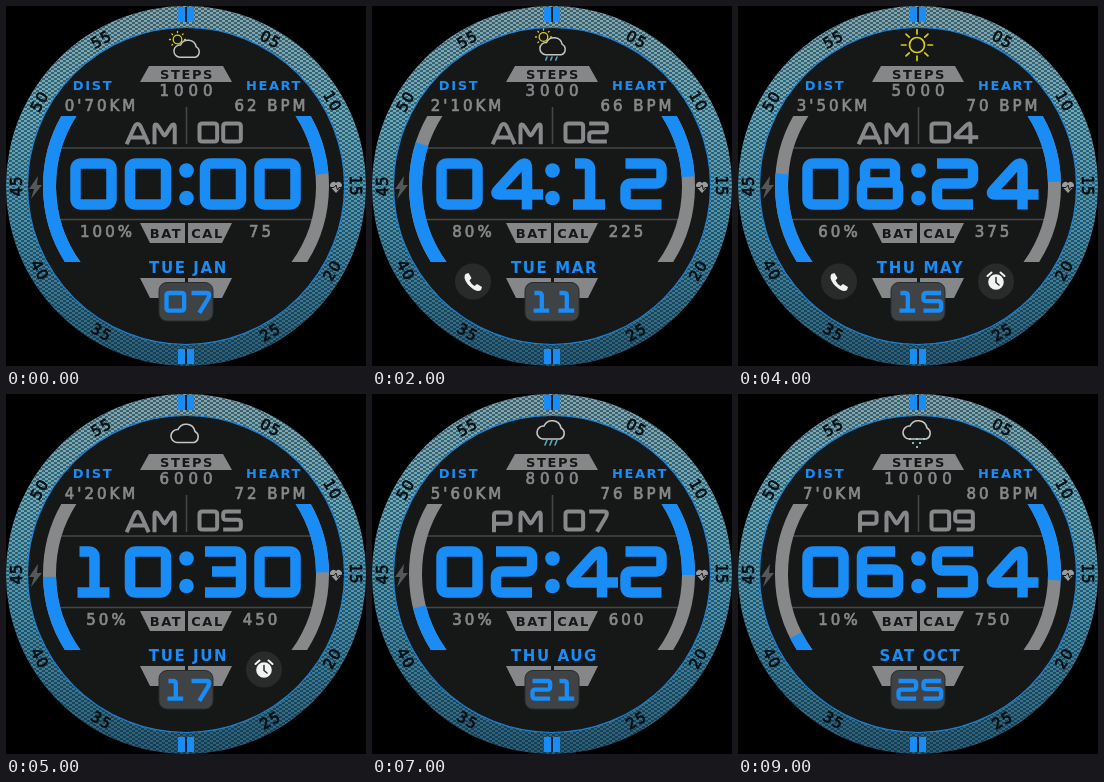
These frames come from a looping animation (360 px wide and 360 px high, 10000 ms). An HTML page:

```html
<!DOCTYPE html>
<html lang="en">
<head>
<meta charset="utf-8">
<title>Watch face</title>
<style>
  html, body { margin: 0; width: 100%; height: 100%; overflow: hidden; background: #000; }
  svg { display: block; width: 100vw; height: 100vh; }
  text { font-family: "DejaVu Sans", sans-serif; text-anchor: middle; }
  .label { font-weight: bold; font-size: 13px; letter-spacing: 1.6px; }
  .value { font-size: 15px; letter-spacing: 3px; fill: #868889; stroke: #868889; stroke-width: .7px; }
  .steps { letter-spacing: 5px; }
  .date { font-size: 15px; letter-spacing: 1.6px; }
  .blue { fill: #1a8cf5; }
  .dark { fill: #161818; }
  .minute { font-size: 15px; letter-spacing: 1px; fill: #081014; stroke: #081014; stroke-width: .7px; }
  .plate { fill: #858788; }
  .glyph { fill: none; stroke-linejoin: round; vector-effect: non-scaling-stroke; }
  .line { fill: none; stroke-linecap: round; stroke-linejoin: round; }
</style>
</head>
<body>
<svg viewBox="0 0 360 360">
  <defs>
    <linearGradient id="metal" x2="0" y2="1">
      <stop offset="0" stop-color="#7fa6b0"/>
      <stop offset=".3" stop-color="#67abc0"/>
      <stop offset=".6" stop-color="#4792b0"/>
      <stop offset="1" stop-color="#285d78"/>
    </linearGradient>
    <pattern id="weave" width="6" height="4" patternUnits="userSpaceOnUse">
      <path d="M0 0h3v2h-3zM3 2h3v2h-3z" fill="#071820" fill-opacity=".5"/>
    </pattern>
    <clipPath id="gaugeArea"><path d="M30 110H330V256H30z"/></clipPath>
  </defs>

  <circle cx="180" cy="180" r="180" fill="url(#metal)"/>
  <circle cx="180" cy="180" r="180" fill="url(#weave)"/>
  <circle cx="180" cy="180" r="158.5" fill="#161818" stroke="#1d7fd0" stroke-width="1.2"/>
  <g id="minutes"></g>
  <path d="M179 1h2v15h-2zM179 343h2v15h-2z" fill="#10222c"/>
  <path class="blue" d="M172 1h7v15h-7zM181 1h7v15h-7zM172 343h7v15h-7zM181 343h7v15h-7z"/>

  <path d="M54 142H306M54 213.5H306M180.5 101V138" stroke="#444747" stroke-width="1.6"/>
  <path class="plate" d="M143 60H217L226 76H134zM134 217H179V237H144zM182 217H226L216 237H182zM134 272H179V292H144zM182 272H226L216 292H182z"/>
  <rect x="153" y="276.5" width="54" height="38.5" rx="8" fill="#404345" stroke="#292c2d"/>

  <text class="label dark" x="181" y="73">STEPS</text>
  <text class="label dark" x="160" y="232">BAT</text>
  <text class="label dark" x="201.5" y="232">CAL</text>
  <text class="label blue" x="87" y="84">DIST</text>
  <text class="label blue" x="268" y="84">HEART</text>

  <path d="M32 170L23 183H28L25 193L36 179H31z" fill="#555858"/>
  <path d="M330 187L325 181.5A3.2 3.2 0 0 1 330 177A3.2 3.2 0 0 1 335 181.5z" fill="#9a9c9c"/>
  <path class="line" d="M324 181.5H328L330 179L331.5 184L333 181.5H336" stroke="#161818"/>
  <g id="live"></g>
</svg>

<script>
const BLUE = '#1a8cf5', GRAY = '#868889', YELLOW = '#d8cc18', CLOUD = '#c4c6c6', CYAN = '#54a9c4';
const live = document.getElementById('live');

// Centre lines of the square display face on a 36 x 41 grid; "z" closes a stroke.
const GLYPHS = {
  0: ['0,0 36,0 36,41 0,41 z'],
  1: ['4,0 19,0 19,41', '2,41 34,41'],
  2: ['0,0 36,0 36,20 0,20 0,41 36,41'],
  3: ['0,0 36,0 36,41 0,41', '7,20 36,20'],
  4: ['31,46 31,0 26,0 -2,31 47,31'],
  5: ['36,0 0,0 0,19 36,19 36,41 0,41'],
  6: ['33,0 0,0 0,41 36,41 36,18 0,18'],
  7: ['0,0 36,0 36,9 16,46'],
  8: ['3,0 33,0 33,19 3,19 z', '0,19 36,19 36,41 0,41 z'],
  9: ['3,41 36,41 36,0 0,0 0,23 36,23'],
  A: ['-3,46 17,-1 25,-1 45,46', '6,30 36,30'],
  M: ['0,46 0,0 6,0 22,28 38,0 44,0 44,46'],
  P: ['0,46 0,0 36,0 36,26 0,26']
};

// Polyline whose corners are rounded off.
function softPath(text, radius = 6) {
  const closed = text.endsWith('z');
  const points = text.replace(' z', '').split(' ').map(p => p.split(',').map(Number));
  const count = points.length;
  const toward = (a, b) => {
    const distance = Math.hypot(b[0] - a[0], b[1] - a[1]);
    const t = Math.min(radius, distance / 2) / distance;
    return [a[0] + (b[0] - a[0]) * t, a[1] + (b[1] - a[1]) * t];
  };
  const steps = points.map((p, i) => !closed && (i === 0 || i === count - 1)
    ? `${p}`
    : `${toward(p, points[(i + count - 1) % count])}Q${p} ${toward(p, points[(i + 1) % count])}`);
  return 'M' + steps.join('L') + (closed ? 'z' : '');
}

const word = (chars, x, y, pitch, scale, color, weight) => [...chars].map((char, i) =>
  `<path class="glyph" transform="translate(${x + i * pitch} ${y}) scale(${scale})" stroke="${color}"
    stroke-width="${weight}" d="${GLYPHS[char].map(s => softPath(s)).join('')}"/>`).join('');

const text = (content, x, y, style = 'value') => `<text class="${style}" x="${x}" y="${y}">${content}</text>`;
const pad = n => String(n).padStart(2, '0');

// Side is -1 for the left gauge and 1 for the right; angles in degrees below the horizon.
function gauge(side, from, to, color) {
  const point = degrees => {
    const a = degrees * Math.PI / 180;
    return `${180 + side * 136.5 * Math.cos(a)} ${180 + 136.5 * Math.sin(a)}`;
  };
  return `<path d="M${point(from)}A136.5 136.5 0 0 ${side > 0 ? 1 : 0} ${point(to)}"
    fill="none" stroke="${color}" stroke-width="13" clip-path="url(#gaugeArea)"/>`;
}

function sun(x, y, r, inner, outer, weight) {
  let rays = '';
  for (let i = 0; i < 8; i++) {
    const c = Math.cos(i * Math.PI / 4), s = Math.sin(i * Math.PI / 4);
    rays += `M${x + c * inner} ${y + s * inner}L${x + c * outer} ${y + s * outer}`;
  }
  return `<g class="line" stroke="${YELLOW}" stroke-width="${weight}"><circle cx="${x}" cy="${y}" r="${r}"/><path d="${rays}"/></g>`;
}

const cloud = (x, y, scale = 1) =>
  `<path transform="translate(${x} ${y}) scale(${scale})" fill="#161818" stroke="${CLOUD}" stroke-width="1.6"
    d="M7 19H24A6 6 0 0 0 25 8A9 9 0 0 0 8 6A6.5 6.5 0 0 0 7 19Z"/>`;
const sunCloud = y => sun(171.5, y, 4.3, 7, 8, 1.3) + cloud(167, y, .93);
const rain = (y, color, length = 5) =>
  `<path class="line" stroke="${color}" stroke-width="1.6"
    d="${[175, 180, 185].map(x => `M${x} ${y}l${-length * .4} ${length}`).join('')}"/>`;
const drops = (y, color) =>
  `<path class="line" stroke="${color}" stroke-width="2.2" d="M172 ${y}h.1M179 ${y}h.1M186 ${y}h.1M175 ${y + 4}h.1M182 ${y + 4}h.1M179 ${y + 8}h.1"/>`;

const WEATHER = [
  () => sunCloud(33.5),
  () => sunCloud(31) + drops(48, CYAN),
  () => sunCloud(31) + rain(51, CYAN, 3),
  () => sunCloud(31) + drops(48, CLOUD),
  () => sun(179, 39, 7.5, 11, 15.5, 1.7),
  () => cloud(164, 29.5),
  () => cloud(164, 29) + rain(45, BLUE),
  () => cloud(164, 26) + rain(46, CYAN),
  () => cloud(164, 26) + rain(44.5, CYAN, 2.5) + rain(49.5, CYAN, 2.5),
  () => cloud(164, 26) + drops(45, '#a9d3d3')
];

const badge = x => `<circle cx="${x}" cy="275.5" r="18" fill="#292b2b"/>`;
const phone = () => badge(101) +
  `<path d="M93.500 268l3-1 3 5-2 2.500q2 4 5 5.500l2.500-2 5 3-1 3q-3 2.500-8-1q-7-5-8.500-11q0-3 1-4z" fill="#f2f2f2"/>`;
const alarm = () => badge(258) +
  `<g class="line" stroke="#f2f2f2" stroke-width="2"><circle cx="258" cy="276" r="6.8" fill="#f2f2f2"/>
   <path d="M249.500 270l4-3.500M266.500 270l-4-3.500"/>
   <path d="M258 271.5V276.5L261 279" stroke="#292b2b" stroke-width="1.5"/></g>`;

function draw(second) {
  const date = new Date(2025, second, 7 + second * 2);
  const day = ['SUN', 'MON', 'TUE', 'WED', 'THU', 'FRI', 'SAT'][date.getDay()];
  const month = ['JAN', 'FEB', 'MAR', 'APR', 'MAY', 'JUN', 'JUL', 'AUG', 'SEP', 'OCT'][second];
  const hour = pad(second * 2 % 12), minute = pad(second * 6);
  const battery = 100 - second * 10, heart = 62 + second * 2;
  const tenths = 7 * (second + 1);
  const distance = `${Math.floor(tenths / 10)}'${tenths % 10 ? tenths % 10 + '0' : '0'}KM`;

  live.innerHTML =
    WEATHER[second]() +
    text(1000 * (second + 1), 182.5, 90, 'value steps') +
    text(distance, 95.5, 105) +
    text(`${heart} BPM`, 265.5, 105) +
    text(`${battery}%`, 101.5, 231) +
    text(75 * (second + 1), 255.5, 231) +
    text(`${day} ${month}`, 182.5, 267, 'label date blue') +
    gauge(-1, -35, 36, GRAY) +
    gauge(-1, battery === 100 ? -35 : 33 - battery * .635, 36, BLUE) +
    gauge(1, -35, 36, GRAY) +
    gauge(1, -35, -32 + 1.08 * Math.round(heart / 2.5), BLUE) +
    word(second < 6 ? 'AM' : 'PM', 122, 118.5, 26.5, '.46 .43', GRAY, 4) +
    word(pad(second), 193.5, 117.5, 23.7, '.49 .44', GRAY, 4) +
    word(hour, 69.5, 157.5, 54.5, 1, BLUE, 10.5) +
    word(minute, 199, 157.5, 54.5, 1, BLUE, 10.5) +
    `<circle class="blue" cx="180.5" cy="164.5" r="7.3"/><circle class="blue" cx="180.5" cy="192" r="7.3"/>` +
    word(pad(7 + second * 2), 160.5, 287, 25, '.49 .43', BLUE, 4.3) +
    (second >= 2 && second <= 4 ? phone() : '') +
    (second >= 4 && second <= 6 ? alarm() : '');
}

// Bezel numbers; the lower ones are turned round to stay readable.
let bezel = '';
for (let m = 5; m < 60; m += 5) {
  if (m === 30) continue;
  const angle = m * 6, a = angle * Math.PI / 180;
  const turn = angle > 90 && angle < 270 ? angle + 180 : angle;
  bezel += `<text class="minute" y="5" transform="translate(${180 + 169 * Math.sin(a)} ${180 - 169 * Math.cos(a)}) rotate(${turn})">${pad(m)}</text>`;
}
document.getElementById('minutes').innerHTML = bezel;

let shown = -1;
const start = performance.now();
function tick() {
  const second = Math.floor((performance.now() - start) / 1000) % 10;
  if (second !== shown) draw(shown = second);
  requestAnimationFrame(tick);
}
tick();
</script>
</body>
</html>
```
